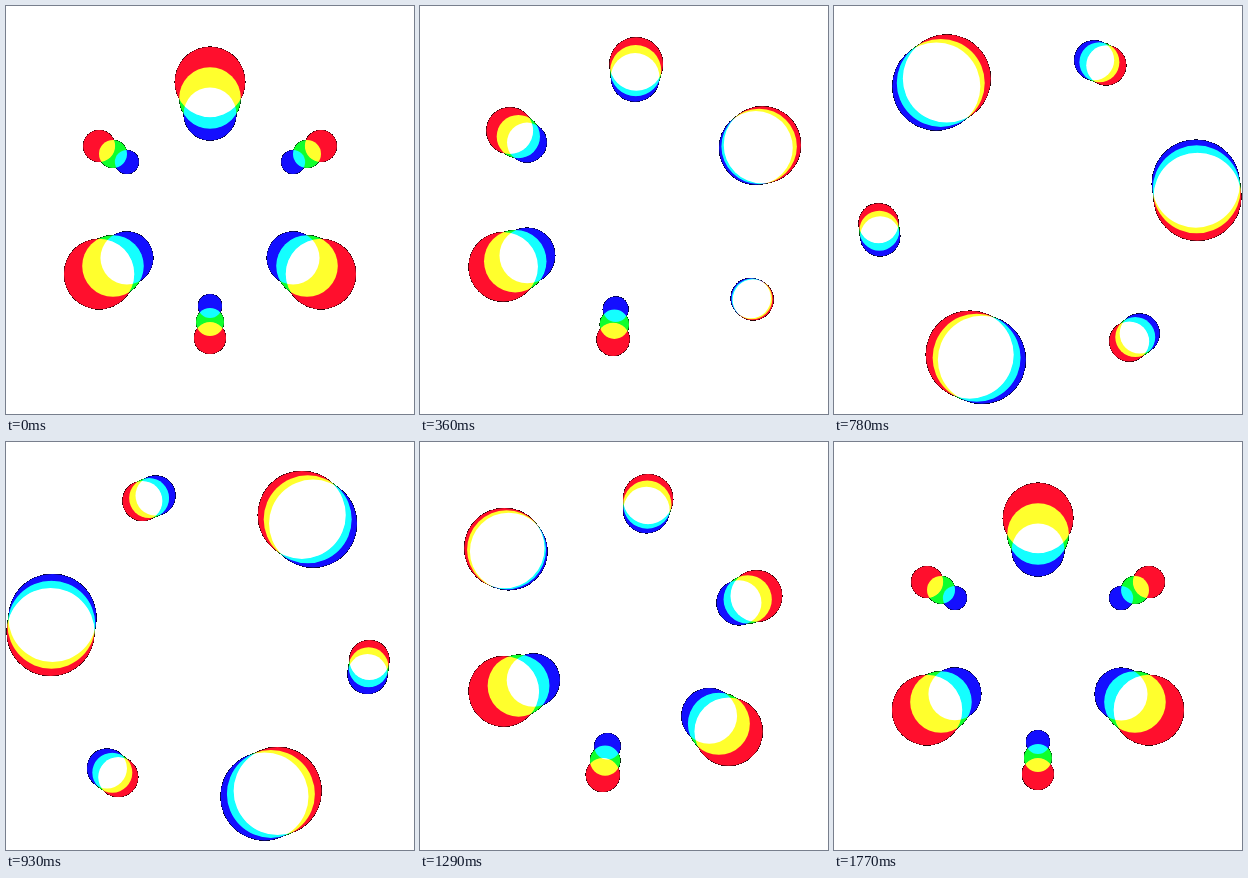
These frames come from a looping animation (408 px wide and 408 px high, 1800 ms). An HTML page with a canvas:

```html
<!DOCTYPE html>
<html>
<head>
<meta charset="utf-8">
<style>
html, body { margin: 0; width: 100%; height: 100%; overflow: hidden; background: #fff; }
canvas { display: block; }
</style>
</head>
<body>
<canvas width="408" height="408"></canvas>
<script>
const SIZE = 408, MID = SIZE / 2, LOOP = 1800, HALF = LOOP / 2, STEP = 30;
const FAR = 160, BIG = 0.275, SMALL = 0.125;
const layers = [
  { color: '#ff0f2d', near: 128, power: 12 },
  { color: '#0fff2d', near: 112, power: 14 },
  { color: '#140fff', near: 96, power: 16 }
];
const ctx = document.querySelector('canvas').getContext('2d', { willReadFrequently: true });

const clamp = x => Math.min(1, Math.max(0, x));
const mix = (a, b, x) => a + (b - a) * x;
const ease = (x, p) => x < 0.5 ? (2 * x) ** p / 2 : 1 - (2 - 2 * x) ** p / 2;

// Balls move out one after another, then return in the same order.
function spread(t, ball) {
  const start = 170 + STEP * ((8 - ball) % 6);
  const ramp = from => clamp((t - from) / 240);
  return t < HALF ? ramp(start) : 1 - ramp(start + HALF);
}

// The untouched black background becomes white, edges stay dark.
function whiten() {
  const image = ctx.getImageData(0, 0, SIZE, SIZE), px = image.data;
  for (let i = 0; i < px.length; i += 4) {
    if (px[i] + px[i + 1] + px[i + 2] < 24) px[i] = px[i + 1] = px[i + 2] = 255;
  }
  ctx.putImageData(image, 0, 0);
}

function draw(t) {
  ctx.globalCompositeOperation = 'source-over';
  ctx.fillStyle = '#000';
  ctx.fillRect(0, 0, SIZE, SIZE);
  ctx.globalCompositeOperation = 'lighten';

  const sway = 15 * ease(1 - Math.abs(t / HALF - 1), 2);
  for (const { color, near, power } of layers) {
    const turn = sway + 120 * ease(t / LOOP, power);
    ctx.fillStyle = color;
    for (let ball = 0; ball < 6; ball++) {
      const x = spread(t, ball);
      const angle = (60 * ball + turn) * Math.PI / 180;
      const dist = mix(near, FAR, ease(x, 2));
      const [from, to] = ball % 2 ? [SMALL, BIG] : [BIG, SMALL];
      const radius = dist * mix(from, to, ease(x, 3));
      ctx.beginPath();
      ctx.arc(MID + dist * Math.sin(angle), MID - dist * Math.cos(angle), radius, 0, 2 * Math.PI);
      ctx.fill();
    }
  }
  whiten();
}

const begin = performance.now();
function tick() {
  const t = (performance.now() - begin) % LOOP;
  draw(Math.floor(t / STEP) * STEP);
  requestAnimationFrame(tick);
}
tick();
</script>
</body>
</html>
```
